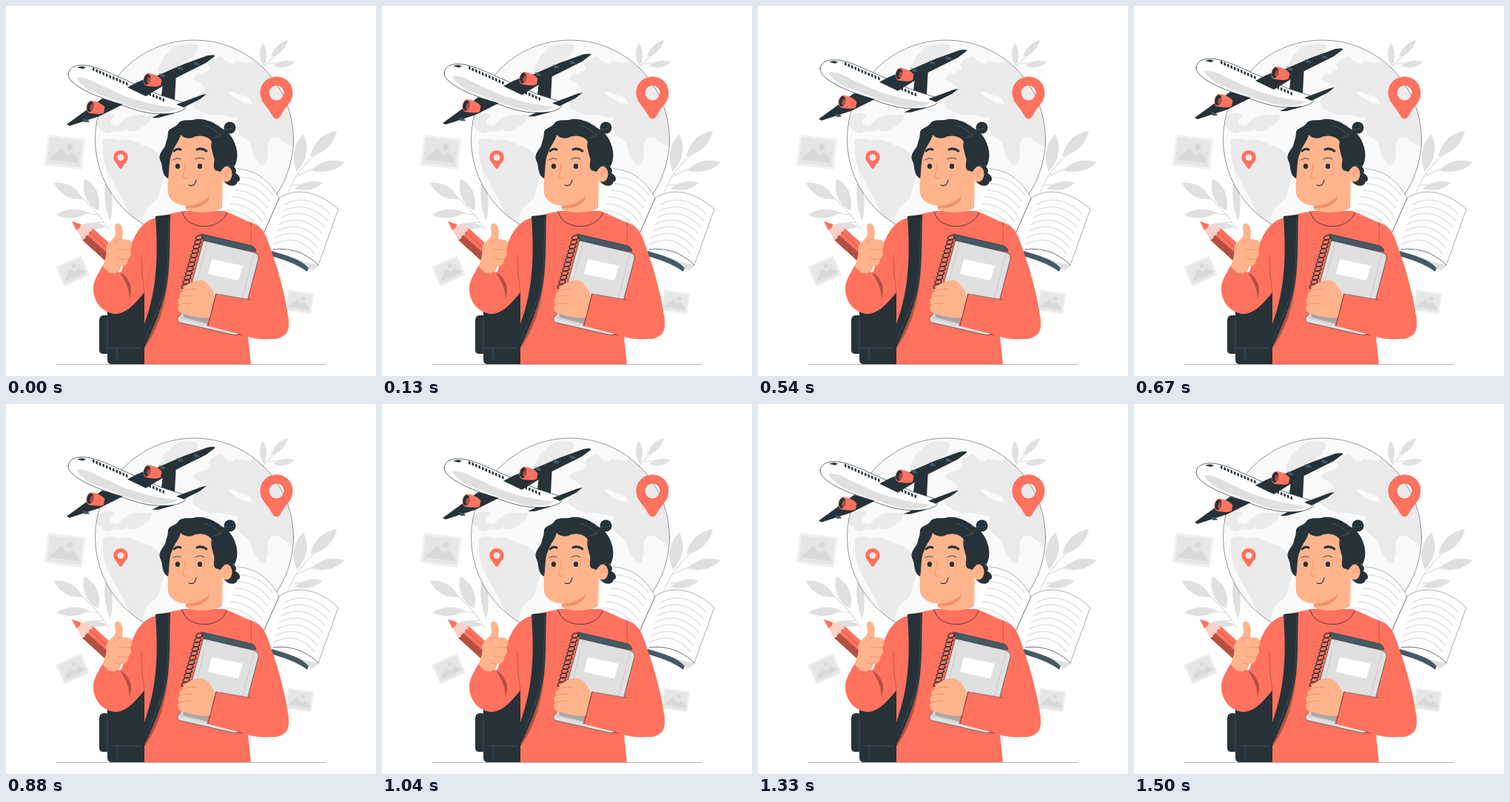
An HTML page with a canvas for the animation above (1.54 s loop, 500 px wide and 500 px high).

```html
<!DOCTYPE html>
<html lang="en">
<head>
<meta charset="utf-8">
<title>Study abroad</title>
<style>
html, body { margin: 0; width: 100%; height: 100%; overflow: hidden; background: #fff; }
canvas { display: block; width: 100vw; height: 100vh; }
</style>
</head>
<body>
<canvas id="stage" width="500" height="500"></canvas>
<script>
const ctx = document.getElementById('stage').getContext('2d');
const CORAL = '#ff725e', CORAL_DARK = '#b35042', DARK = '#263238', SLATE = '#455a64';
const SKIN = '#ffb48c', SKIN_DARK = '#f28f6b', LAND = '#ebebeb', GREY = '#e0e0e0', PALE = '#fafafa';
const LOOP = 1540, FLOAT = 1500, RISE = 10, STEP = 1000 / 24;

ctx.lineCap = ctx.lineJoin = 'round';

function shape(d, fill, stroke, width = 0.6) {
  const path = new Path2D(d);
  if (fill) { ctx.fillStyle = fill; ctx.fill(path, 'evenodd'); }
  if (stroke) { ctx.strokeStyle = stroke; ctx.lineWidth = width; ctx.stroke(path); }
}

const line = (d, color = DARK, width = 0.8) => shape(d, null, color, width);

function oval(x, y, rx, ry, fill, angle = 0, stroke, width = 0.8) {
  ctx.beginPath();
  ctx.ellipse(x, y, rx, ry, angle, 0, Math.PI * 2);
  if (fill) { ctx.fillStyle = fill; ctx.fill(); }
  if (stroke) { ctx.strokeStyle = stroke; ctx.lineWidth = width; ctx.stroke(); }
}

// Pointed leaf from base to tip, bulging by w on both sides.
function leaf(x, y, tx, ty, w) {
  const len = Math.hypot(tx - x, ty - y);
  const nx = -(ty - y) / len * w, ny = (tx - x) / len * w;
  const mx = x + (tx - x) * 0.52, my = y + (ty - y) * 0.52;
  shape(`M${x} ${y}Q${mx + nx} ${my + ny} ${tx} ${ty}Q${mx - nx} ${my - ny} ${x} ${y}`, GREY);
}

function photo(x, y, w, h, angle) {
  ctx.save();
  ctx.translate(x, y);
  ctx.rotate(angle);
  ctx.scale(w / 50, h / 40);
  shape('M-25-20H25V20H-25Z', '#f0f0f0');
  shape('M-22-17H22V17H-22Z', '#e6e6e6');
  shape('M-20 12L-7-3Q-5-5-3-3L4 4L9 0Q11-1 13 1L21 12Z', '#d9d9d9');
  oval(6, -8, 4, 4, '#d9d9d9');
  ctx.restore();
}

function pin(x, y, s) {
  ctx.save();
  ctx.translate(x, y);
  ctx.scale(s, s);
  shape('M0 34C-4 34-6 29-9 24C-14 16-22 10-22-1C-22-14-12-23 0-23S22-14 22-1C22 10 14 16 9 24C6 29 4 34 0 34ZM-10-1A10 10 0 1 0 10-1A10 10 0 1 0-10-1Z', CORAL);
  ctx.restore();
}

function globe() {
  ctx.save();
  ctx.beginPath();
  ctx.arc(254.5, 180, 134, 0, Math.PI * 2);
  ctx.fillStyle = PALE;
  ctx.fill();
  ctx.clip();
  shape('M205 82C214 76 210 66 220 63C226 52 242 48 258 52C263 58 254 62 255 68C246 72 242 78 232 80C225 89 214 92 205 89Z', LAND);
  shape('M252 99C260 88 270 92 276 84C268 79 280 69 292 68C296 75 304 82 311 74L330 77L345 66L410 110L395 191C380 192 374 180 366 178C356 176 352 186 354 199C352 217 346 220 340 210C331 200 334 186 323 179C311 172 309 164 314 151C302 152 288 143 276 148L259 140C247 135 250 122 263 117C276 113 266 105 252 99Z', LAND);
  shape('M300 117C308 113 313 121 322 121C329 125 334 128 332 133C322 132 312 127 300 117Z', PALE);
  shape('M121 152C130 143 142 143 148 148C138 154 140 161 148 162C157 161 156 152 168 149C180 146 190 148 196 146C200 154 190 160 184 164C176 170 170 172 164 167C152 171 146 168 138 172C128 172 128 162 119 160Z', LAND);
  shape('M131 182C140 174 149 184 160 181C172 179 180 188 192 190C204 196 214 205 215 220C214 235 208 245 207 255C205 265 194 266 190 275C184 282 186 292 180 302L168 285C160 262 150 250 143 235C134 222 130 205 131 182Z', LAND);
  ctx.restore();
  oval(254.5, 180, 134, 134, null, 0, DARK, 0.5);
}

function plants() {
  line('M343 91Q351 76 373 60M349 82Q352 74 348 65M355 78L372 76', GREY, 1.2);
  leaf(358, 69, 381, 46, 9);
  leaf(361, 81, 390, 76, 9);
  leaf(348, 80, 347, 50, 9);

  line('M381 252Q393 220 426 194M390 232Q407 222 430 216M386 242L405 242', GREY, 1.3);
  leaf(393, 224, 402, 173, 17);
  leaf(411, 203, 447, 169, 16);
  leaf(412, 222, 458, 211, 14);
  leaf(390, 247, 428, 239, 11);

  line('M139 302Q121 273 91 249M126 282Q108 279 83 281M132 292L114 294', GREY, 1.3);
  leaf(104, 261, 65, 239, 15);
  leaf(112, 279, 68, 282, 12);
  leaf(125, 277, 106, 233, 17);
  leaf(141, 291, 136, 231, 10);
  leaf(136, 298, 102, 296, 9);
}

function book() {
  shape('M360 331L410 348L423 350L415 357L360 337Z', GREY);
  shape('M359 331C378 337 397 341 409 354L407 359C392 348 374 342 358 338Z', SLATE);
  shape('M313 220C338 222 357 236 369 260L360 329C340 300 318 289 286 291Z', '#fff');
  shape('M369 260C387 246 420 247 449 275L422 350C407 335 387 326 361 329Z', '#fff');
  line('M313 220C338 222 357 236 369 260C387 246 420 247 449 275L422 350', DARK, 0.4);
  line('M369 260L342 321M361 329C387 326 407 335 422 350', DARK, 0.7);
  for (let i = 0; i < 7; i++) {
    const x = 317 - i * 3.5, y = 231 + i * 9;
    line(`M${x} ${y}Q${x + 26} ${y + 1} ${x + 43} ${y + 24}`, GREY, 1.5);
    const rx = 377 - i * 2.5, ry = 268 + i * 9;
    line(`M${rx} ${ry}Q${rx + 31} ${ry - 16} ${rx + 61 - i} ${ry + 13}`, GREY, 1.5);
  }
}

function engine(x, y) {
  ctx.save();
  ctx.translate(x, y);
  ctx.rotate(0.22);
  shape('M-6-9C2-10 10-7 13-4L13 4C8 7 2 8-6 8Z', CORAL);
  oval(-6, -0.5, 5.5, 8.6, CORAL);
  oval(-6.5, -0.5, 4.4, 7.2, DARK);
  oval(-4.5, 0, 2, 4.5, CORAL_DARK);
  ctx.restore();
}

function plane() {
  shape('M197 151L212 144L228 145L206 151Z', DARK);
  shape('M213 97L230 90L228 127L210 121Z', DARK);
  shape('M84 92C85 84 92 80 103 80C119 80 137 89 155 97L207 120L238 130C243 133 244 138 240 140C229 147 210 146 196 145C175 142 154 133 135 126C117 120 98 111 89 102C86 99 84 96 84 92Z', '#fff', DARK, 0.7);
  shape('M95 97C108 94 122 105 139 112C166 126 197 134 233 138C222 145 206 144 195 143C171 138 144 126 122 118C110 113 100 106 95 97Z', GREY);
  shape('M96 83Q103 80 108 83L104 85Z', DARK);
  for (let i = 0; i < 22; i++) {
    if (i > 10 && i < 17) continue;
    const x = 117 + i * 4.5, y = 83 + i * 1.98;
    shape(`M${x} ${y}l2.5 1l0 4l-2.5-1Z`, DARK);
  }
  shape('M164 110C177 103 186 98 200 96L239 79L272 67Q284 65 282 68L270 77L230 97L189 122Z', DARK);
  shape('M230 133L265 120L271 119L262 126L240 137Z', DARK);
  shape('M130 125L158 133L126 149L86 162L82 160L104 144Z', DARK);
  for (const [x, y] of [[211, 94], [235, 84], [257, 78], [108, 155]]) {
    shape(`M${x - 4} ${y - 3}L${x + 3} ${y - 1}L${x + 5} ${y + 2}L${x - 2} ${y + 2}Z`, SLATE);
  }
  engine(197, 101);
  engine(120, 138);
}

function backpack() {
  shape('M137 390L160 382L190 375V484H142Q137 484 137 477Z', DARK);
  shape('M137 418H131Q126 419 126 425V465Q126 470 131 470H137Z', DARK);
  line('M137 418V470M139 462H181M150 462V479', SLATE, 0.7);
}

function pencil() {
  shape('M103 316L117 300L151 331L137 347Z', CORAL);
  shape('M103 316L109 309L144 340L137 347Z', CORAL_DARK);
  line('M113 305L147 336', CORAL_DARK, 0.8);
  shape('M89 291L117 300Q116 306 112 305Q113 311 108 310Q108 315 103 316Z', '#ffd0c7');
  shape('M89 291L101 295Q100 301 95 303Z', CORAL);
}

function body() {
  shape('M240 277C225 280 209 283 200 287C184 292 175 306 168 326L155 361L133 347C125 361 117 372 118 384C119 403 134 417 151 416C166 413 176 400 187 387V484H331L327 447C344 452 366 451 376 445C383 440 383 430 381 418C376 383 365 348 354 318C349 302 341 295 327 291L296 277Z', CORAL);
  shape('M153 358C163 366 174 377 167 396C167 382 161 371 153 358Z', CORAL_DARK);
  line('M183 336Q183 362 187 387', CORAL_DARK, 0.8);
  line('M331 292C331 307 331 316 332 325', CORAL_DARK, 0.7);
  shape('M220 330C222 380 212 428 187 463C206 418 217 370 220 330Z', CORAL_DARK);
  shape('M202 284L222 282C221 310 222 338 219 364C214 403 201 430 187 462V430C206 378 205 330 202 284Z', DARK);
  line('M220 284C219 317 220 343 216 368C211 402 198 426 188 449', SLATE, 0.6);
}

function raisedHand() {
  shape('M147 298C147 292 155 292 157 300C159 306 157 311 157 315L166 316C172 318 171 325 168 329C170 335 168 340 165 342C165 349 160 352 155 352C154 360 148 363 138 360L131 352C133 342 137 337 135 328C137 318 147 316 148 308Z', SKIN);
  line('M157 315C152 315 149 317 147 320M168 329Q159 330 152 328M165 342Q157 343 151 340M155 352L149 350', SKIN_DARK, 0.9);
}

function notebook() {
  shape('M239 418L325 397L328 443Q318 447 302 443Z', CORAL_DARK);
  shape('M264 308L328 323Q338 325 338 332L268 320Z', SLATE, DARK, 0.6);
  shape('M267 317L335 333Q342 335 341 342L315 441Q313 446 306 444L236 428Q231 427 232 421L240 414Z', GREY, DARK, 0.6);
  shape('M238 414L310 431L308 440L234 422Z', '#d2d2d2');
  shape('M238 409C252 410 268 417 281 414L276 430L240 421Z', '#a6a6a6');
  line('M335 335L309 436M272 319L247 414', '#bcbcbc', 0.6);
  shape('M278 342L320 351L314 371L273 362Z', '#fff');
  for (let i = 0; i < 12; i++) {
    oval(261 - i * 1.75, 313 + i * 6, 4.6, 3.1, null, -0.35, DARK, 1.2);
    oval(265 - i * 1.75, 314 + i * 6, 1, 1, DARK);
  }
}

function holdingArm() {
  shape('M283 389L330 397L360 386L381 418C384 437 378 449 363 450C336 450 303 440 271 432Z', CORAL);
  shape('M238 386C239 377 250 373 258 371C268 368 274 375 282 389L276 421C261 423 247 418 237 415C231 413 232 407 234 404C231 399 233 395 235 394C233 390 235 387 238 386Z', SKIN);
  line('M238 386Q247 381 257 383M235 394Q245 390 253 392M234 404Q243 400 251 402', SKIN_DARK, 0.9);
  line('M284 389L273 432', DARK, 0.7);
  line('M284 389L330 397', DARK, 0.5);
}

function head() {
  shape('M244 256L293 222L292 273C281 280 256 281 243 275Z', SKIN);
  shape('M243 269C256 269 268 265 276 256C273 269 259 275 243 273Z', SKIN_DARK);
  line('M238 278C244 304 290 304 298 280', DARK, 0.8);
  shape('M292 218C302 211 315 218 310 226C317 229 318 237 313 237C312 245 300 245 294 236Z', DARK);
  shape('M221 190C220 211 218 234 219 252C220 264 233 270 247 270C264 268 277 259 284 246L291 225L287 178L262 168L236 168Z', SKIN);
  oval(298, 227, 7.5, 10.5, SKIN);
  line('M296 229Q298 221 302 222', SKIN_DARK, 1);
  shape('M219 233C209 228 213 215 208 208C206 199 212 195 215 189C217 181 219 178 219 170C222 163 230 165 234 157C242 152 249 156 256 153C269 152 281 157 291 165C301 170 307 178 310 188C314 199 313 210 308 218C303 214 296 215 292 221L290 224L283 222C278 217 284 209 280 202C279 196 276 190 278 183C273 176 262 173 252 178C244 180 239 177 236 174C234 184 226 190 224 200C220 207 221 222 219 233Z', DARK);
  oval(302.5, 164.5, 8, 8, DARK);
  line('M295 169Q290 177 280 178M266 161Q282 164 291 177M296 165Q303 169 307 164', '#5a6970', 0.6);
  oval(232, 216.5, 3.1, 3.5, DARK);
  oval(262, 216.5, 3.1, 3.5, DARK);
  line('M227 196Q231 192 236 194M258 194Q264 191 271 196', DARK, 3);
  line('M226 208Q231 204 236 207M256 207Q262 203 268 207', DARK, 0.9);
  line('M242 212C242 221 239 227 239 231Q241 234 245 232', SKIN_DARK, 0.9);
  line('M247 242Q255 245 257 235', DARK, 1.2);
}

function draw(time) {
  const beat = Math.floor((time % LOOP + 5.1) / STEP) * STEP;
  const phase = beat % FLOAT / FLOAT;
  const lift = RISE * (1 - Math.abs(1 - 2 * phase));

  ctx.fillStyle = '#fff';
  ctx.fillRect(0, 0, 500, 500);
  plants();
  photo(79.5, 197.5, 51, 41, 0.12);
  photo(90, 358, 38, 29, -0.42);
  photo(396.5, 400, 36, 28, 0.15);
  line('M68 484.5H432', '#a8adaf', 0.9);
  globe();
  pin(365.5, 118.5, 1);
  pin(155, 205, 0.44);
  ctx.save();
  ctx.translate(0, -lift);
  plane();
  ctx.restore();
  book();
  backpack();
  pencil();
  body();
  raisedHand();
  notebook();
  holdingArm();
  head();
}

const start = performance.now();
function tick() {
  draw(performance.now() - start);
  requestAnimationFrame(tick);
}
tick();
</script>
</body>
</html>
```
